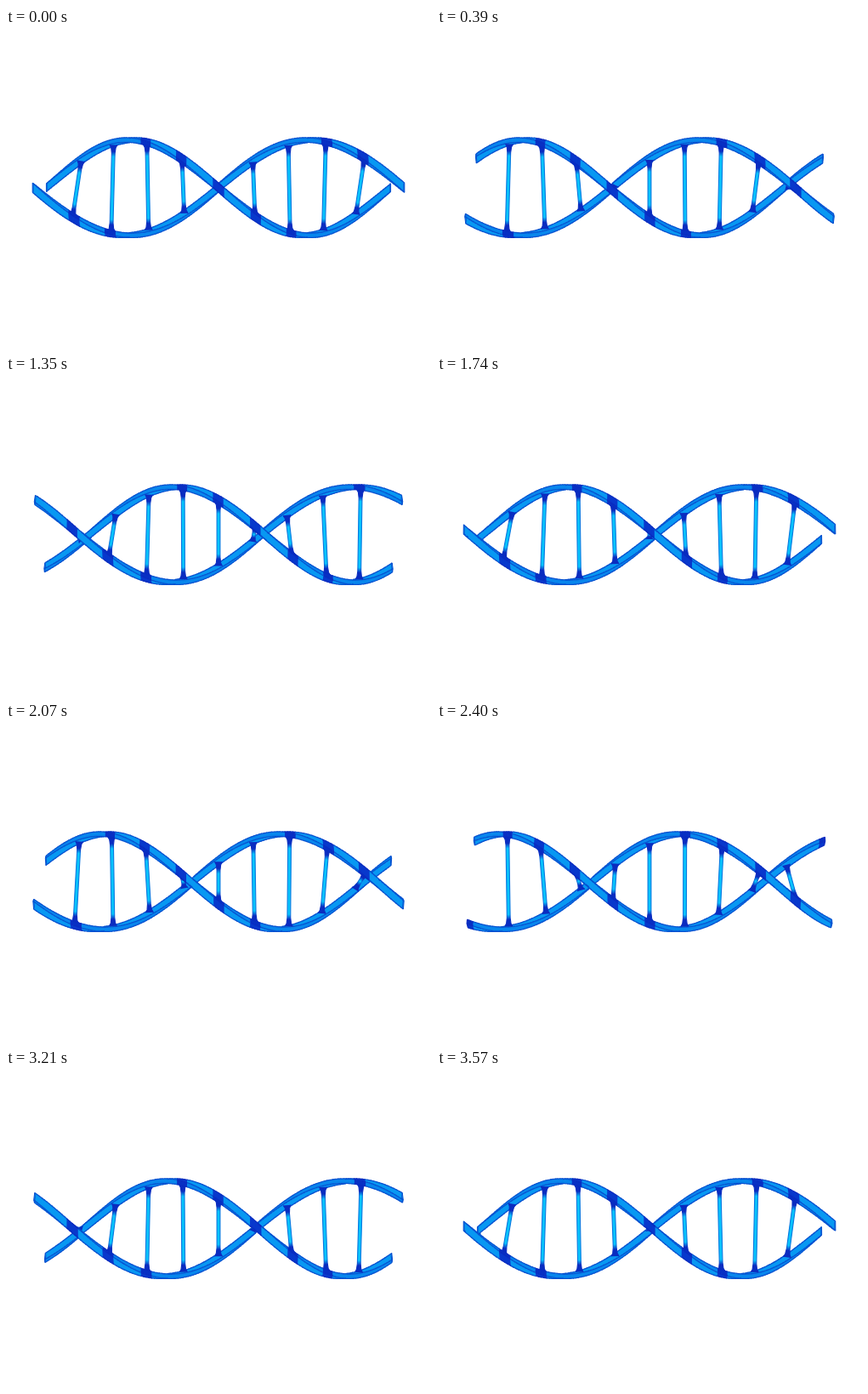
An HTML page with a canvas that plays this animation: 500 by 375 pixels, repeating every 3600 ms.

```html
<!DOCTYPE html>
<html lang="en">
<head>
<meta charset="utf-8">
<title>Double helix</title>
<style>
  html, body { margin: 0; width: 100%; height: 100%; overflow: hidden; background: #fff; }
  canvas { display: block; width: 500px; height: 375px; }
</style>
</head>
<body>
<canvas id="stage" width="500" height="375"></canvas>
<script>
const ctx = document.getElementById('stage').getContext('2d');

const LOOP = 3600, TICK = 30;
const CX = 250, CY = 187.7;
const HALF = 210;          // half the length, also half the pitch
const R = 56, DEPTH = 1450;
const THICK = 2.7;         // radial half thickness of a ribbon
const SPREAD = 0.09;       // angular half width of a ribbon
const STEP = 3, GAP = 41.6; // ribbon slice length, rung spacing
const EDGE = '#0650d0', JOINT = '#0a2cc0';

function project(x, r, a) {
  const k = DEPTH / (DEPTH - r * Math.cos(a));
  return [CX + x * k, CY + r * Math.sin(a) * k];
}

function trace(points) {
  ctx.beginPath();
  points.forEach(p => ctx.lineTo(p[0], p[1]));
}

function fill(points, color) {
  trace(points);
  ctx.closePath();
  ctx.fillStyle = color;
  ctx.fill();
}

function stroke(points, color, width) {
  trace(points);
  ctx.strokeStyle = color;
  ctx.lineWidth = width;
  ctx.stroke();
}

// Corners run around the section: outer-, outer+, inner+, inner-
function section(x, a) {
  return [[1, -1], [1, 1], [-1, 1], [-1, -1]].map(
    ([r, d]) => project(x, R + r * THICK, a + d * SPREAD));
}

// Rungs show through the near side; two of the tips are dark at the arches
function isDark(x, a) {
  const k = Math.round(x / GAP);
  if (Math.abs(k) < 5 && Math.abs(x - k * GAP) < 6) return Math.cos(a) > 0;
  const y = Math.sin(a);
  return Math.abs(x) > HALF - 6 && Math.abs(y) > 0.8 && x * y < 0;
}

function drawSlice(x, angleAt, shift) {
  const pad = 0.4;
  const x0 = Math.max(-HALF, x - pad);
  const x1 = Math.min(HALF, x + STEP + pad);
  const mid = x + STEP / 2;
  const a = angleAt(mid) + shift;
  const p = section(x0, angleAt(x0) + shift);
  const q = section(x1, angleAt(x1) + shift);
  const dark = isDark(mid, a);
  const face = dark ? '#0838cc' : '#0898f2';
  const side = dark ? '#0830c4' : '#0886ec';
  const edge = dark ? JOINT : EDGE;
  const c = Math.cos(a), s = Math.sin(a);
  const facing = [c, -s, -c, s];

  facing.forEach((z, i) => {
    const j = (i + 1) % 4;
    if (z > 0) fill([p[i], q[i], q[j], p[j]], i % 2 ? side : face);
  });
  facing.forEach((z, i) => {
    if (z > 0 || facing[(i + 3) % 4] > 0) stroke([p[i], q[i]], edge, 1.3);
  });

  if (x <= -HALF) stroke([...p, p[0]], edge, 1);
  if (x + STEP >= HALF) stroke([...q, q[0]], edge, 1);
}

function drawRung(x, a) {
  const p = project(x, R - THICK, a);
  const q = project(x, R - THICK, a + Math.PI);
  const dx = q[0] - p[0], dy = q[1] - p[1];
  const len = Math.hypot(dx, dy);
  if (len < 1) return;
  const ux = dx / len, uy = dy / len;
  const flare = Math.min(10, len * 0.35);
  const at = (d, w) => [p[0] + ux * d - uy * w, p[1] + uy * d + ux * w];
  const rail = w => [
    at(0, w * 4.5), at(flare * 0.35, w * 2.7), at(flare, w * 1.9),
    at(len - flare, w * 1.9), at(len - flare * 0.35, w * 2.7), at(len, w * 4.5)
  ];
  const left = rail(1), right = rail(-1);
  const tones = (end, middle) => {
    const shade = ctx.createLinearGradient(p[0], p[1], q[0], q[1]);
    const f = flare / len;
    shade.addColorStop(0, end);
    shade.addColorStop(f * 0.8, end);
    shade.addColorStop(f * 1.4, middle);
    shade.addColorStop(1 - f * 1.4, middle);
    shade.addColorStop(1 - f * 0.8, end);
    shade.addColorStop(1, end);
    return shade;
  };
  fill([...left, ...right.slice().reverse()], tones(JOINT, '#08c4fc'));
  const rim = tones(JOINT, '#0878e0');
  stroke(left, rim, 1.1);
  stroke(right, rim, 1.1);
}

function draw(time) {
  const turn = Math.PI * 2 * time / LOOP;
  const angleAt = x => Math.PI * x / HALF + turn;
  const parts = [];

  for (const shift of [0, Math.PI])
    for (let x = -HALF; x < HALF; x += STEP)
      parts.push({
        z: Math.cos(angleAt(x + STEP / 2) + shift),
        paint: () => drawSlice(x, angleAt, shift)
      });

  for (let k = -4; k <= 4; k++)
    parts.push({ z: 0, paint: () => drawRung(k * GAP, angleAt(k * GAP)) });

  ctx.fillStyle = '#fff';
  ctx.fillRect(0, 0, 500, 375);
  ctx.lineJoin = 'round';
  parts.sort((m, n) => m.z - n.z).forEach(part => part.paint());
}

const start = performance.now();
let last = -1;

function frame() {
  const elapsed = Math.max(0, performance.now() - start) % LOOP;
  const time = Math.floor(elapsed / TICK) * TICK;
  if (time !== last) draw(last = time);
  requestAnimationFrame(frame);
}

frame();
</script>
</body>
</html>
```
